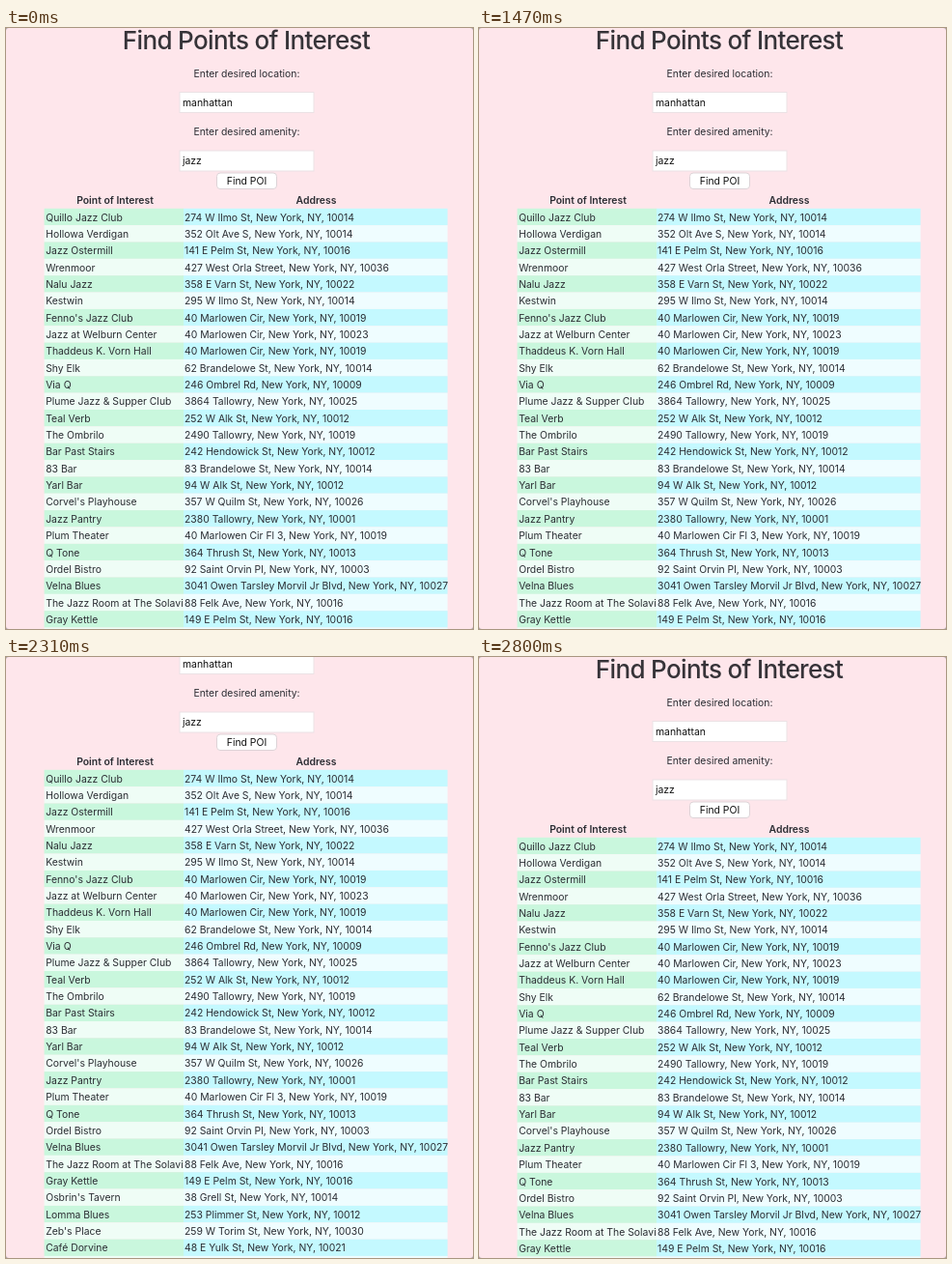
An HTML page for the animation above (2870 ms loop, 484 px wide and 622 px high).

```html
<!DOCTYPE html>
<html lang="en">
<head>
<meta charset="utf-8">
<title>Find Points of Interest</title>
<style>
  html, body { margin: 0; width: 100%; height: 100%; overflow: hidden; background: #aaa2a5; }
  svg { display: block; width: 484px; height: 622px; border-radius: 3px; background: #fee6eb; }
  text { font: 10.4px Inter, Roboto, sans-serif; fill: #2b2d33; }
  .title { font-size: 26px; font-weight: 500; letter-spacing: -.025em; fill: #363338; }
  .head { font-weight: 600; }
  .mid { text-anchor: middle; }
  .field { fill: #fff; stroke: #ebe2e5; }
  .button { fill: #fff; stroke: #ddd3d7; }
  .typed { fill: #111; }
</style>
</head>
<body>
<svg viewBox="0 0 484 622"><g id="page"></g></svg>
<script>
// name | street | last two digits of the zip code
const places = `Quillo Jazz Club|274 W Ilmo St|14
Hollowa Verdigan|352 Olt Ave S|14
Jazz Ostermill|141 E Pelm St|16
Wrenmoor|427 West Orla Street|36
Nalu Jazz|358 E Varn St|22
Kestwin|295 W Ilmo St|14
Fenno's Jazz Club|40 Marlowen Cir|19
Jazz at Welburn Center|40 Marlowen Cir|23
Thaddeus K. Vorn Hall|40 Marlowen Cir|19
Shy Elk|62 Brandelowe St|14
Via Q|246 Ombrel Rd|09
Plume Jazz &amp; Supper Club|3864 Tallowry|25
Teal Verb|252 W Alk St|12
The Ombrilo|2490 Tallowry|19
Bar Past Stairs|242 Hendowick St|12
83 Bar|83 Brandelowe St|14
Yarl Bar|94 W Alk St|12
Corvel's Playhouse|357 W Quilm St|26
Jazz Pantry|2380 Tallowry|01
Plum Theater|40 Marlowen Cir Fl 3|19
Q Tone|364 Thrush St|13
Ordel Bistro|92 Saint Orvin Pl|03
Velna Blues|3041 Owen Tarsley Morvil Jr Blvd|27
The Jazz Room at The Solavi|88 Felk Ave|16
Gray Kettle|149 E Pelm St|16
Osbrin's Tavern|38 Grell St|14
Lomma Blues|253 Plimmer St|12
Zeb's Place|259 W Torim St|30
Café Dorvine|48 E Yulk St|21`.split('\n').map(line => line.split('|'));

const TABLE_TOP = 186.8, ROW = 17.35;
const LEFT = 39.6, SPLIT = 184, RIGHT = 457.6;
const LOOP = 2870;

const text = (x, y, content, cls = '') => `<text x="${x}" y="${y}" class="${cls}">${content}</text>`;
const box = (x, y, w, h, attrs) => `<rect x="${x}" y="${y}" width="${w}" height="${h}" ${attrs}/>`;
const field = (y, value) => box(180, y, 139, 21, 'class="field"') + text(183, y + 14.3, value, 'typed');

function row(i) {
  const y = TABLE_TOP + i * ROW;
  const [green, blue] = i % 2 ? ['#effdf6', '#effdff'] : ['#c9f7dd', '#c4f9ff'];
  let out = box(LEFT, y, SPLIT - LEFT, ROW, `fill="${green}"`)
          + box(SPLIT, y, RIGHT - SPLIT, ROW, `fill="${blue}"`);
  if (places[i]) {
    const [name, street, zip] = places[i];
    out += text(LEFT + 1.6, y + 12.7, name)
         + text(SPLIT + 1, y + 12.7, `${street}, New York, NY, 100${zip}`);
  }
  return out;
}

const page = document.getElementById('page');
page.innerHTML = text(249, 22, 'Find Points of Interest', 'title mid')
  + text(249.5, 50.7, 'Enter desired location:', 'mid')
  + field(66.5, 'manhattan')
  + text(249.5, 111.3, 'Enter desired amenity:', 'mid')
  + field(127, 'jazz')
  + box(218.5, 150, 62, 16.5, 'rx="3.5" class="button"')
  + text(249.5, 162.3, 'Find POI', 'mid typed')
  + text(113, 182, 'Point of Interest', 'head mid')
  + text(321.5, 182, 'Address', 'head mid')
  + Array.from({ length: places.length + 1 }, (_, i) => row(i)).join('');

function scrollAt(t) {
  if (t < 2310 || t >= 2450) return 0;
  return t < 2380 ? 70 : 40;
}

function draw() {
  page.setAttribute('transform', `translate(0 ${-scrollAt(performance.now() % LOOP)})`);
  requestAnimationFrame(draw);
}
draw();
</script>
</body>
</html>
```
